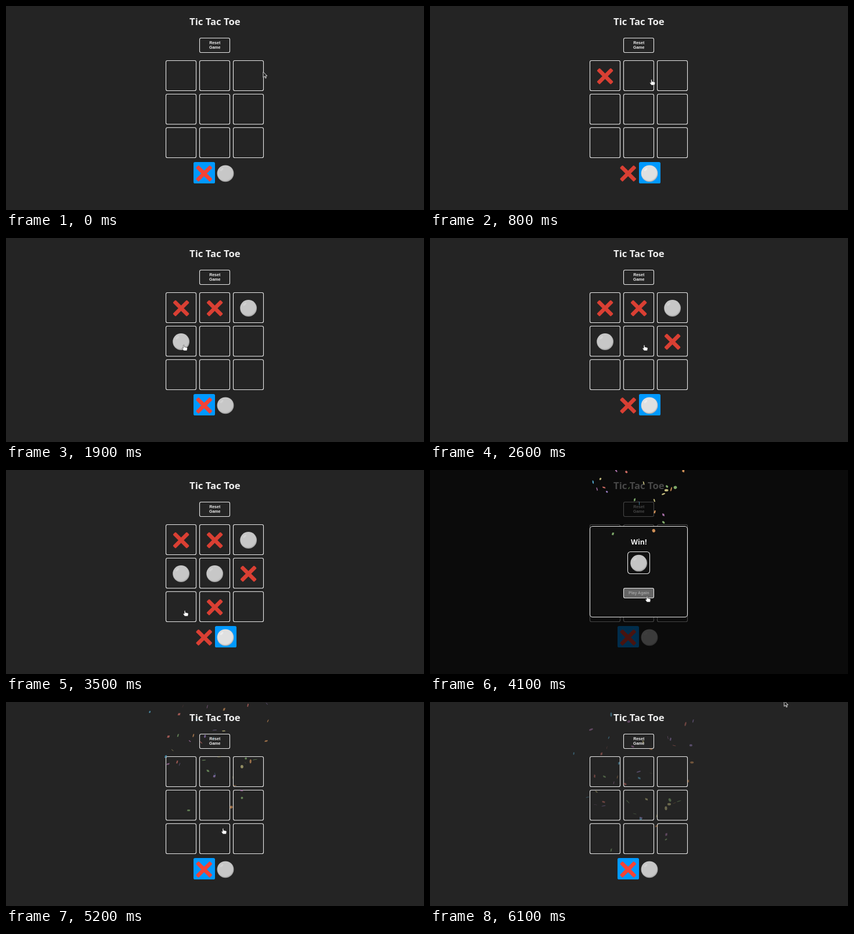
These frames come from a looping animation (720x353 px, 6200 ms). An HTML page with a canvas:

```html
<!DOCTYPE html>
<html lang="en">
<head>
<meta charset="utf-8">
<title>Tic Tac Toe</title>
<style>
  html, body { margin: 0; width: 720px; height: 353px; overflow: hidden; background: #242424; }
  svg, canvas { position: absolute; left: 0; top: 0; display: block; }
  text { text-anchor: middle; fill: #eee; }
  .head { font: bold 16.7px "Noto Sans", "Open Sans", sans-serif; }
  .win { font: bold 12.4px "Noto Sans", "Open Sans", sans-serif; }
  .label { font: bold 7.03px "Liberation Sans", Arial, sans-serif; }
  .box { fill: none; stroke: #e9e9e9; stroke-width: 1.1; }
  .mark { opacity: .87; }
  .mark.on { opacity: 1; }
</style>
</head>
<body>
<svg width="720" height="353" viewBox="0 0 720 353">
  <defs>
    <radialGradient id="pearl" cx=".48" cy=".46" r=".54">
      <stop offset=".82" stop-color="#e0e0e0"/>
      <stop offset="1" stop-color="#adadad"/>
    </radialGradient>
    <g id="X" fill="#f44336">
      <rect x="-17" y="-3.4" width="34" height="6.8" rx="1.6" transform="rotate(45)"/>
      <rect x="-17" y="-3.4" width="34" height="6.8" rx="1.6" transform="rotate(-45)"/>
    </g>
    <g id="O">
      <circle r="14.4" fill="url(#pearl)"/>
      <ellipse cx="-6.5" cy="-7" rx="3.6" ry="1.8" transform="rotate(-42 -6.5 -7)" fill="#fff" opacity=".4"/>
    </g>
  </defs>

  <text class="head" x="359.9" y="33">Tic Tac Toe</text>
  <rect class="box" x="333.5" y="55.5" width="52" height="25" rx="2.4"/>
  <text class="label" x="359.7" y="66.2">Reset</text>
  <text class="label" x="359.7" y="74.2">Game</text>

  <g id="board"></g>

  <rect id="turn" y="270" width="37" height="37" rx="2.6" fill="#09f"/>
  <use id="turnX" class="mark" href="#X" x="341.2" y="289.8"/>
  <use id="turnO" class="mark" href="#O" x="378" y="289.8"/>

  <g id="modal">
    <rect width="720" height="353" opacity=".7"/>
    <rect class="box" x="275.5" y="97.5" width="168" height="157" rx="4.6" style="fill:#111"/>
    <text class="win" x="359.8" y="128.6">Win!</text>
    <rect class="box" x="340.5" y="141.5" width="38" height="38" rx="5"/>
    <use class="mark" href="#O" x="359.6" y="161.2"/>
    <rect id="again" class="box" x="333.5" y="204.5" width="52" height="17" rx="2.4"/>
    <text id="againText" class="label" x="359.8" y="215.3">Play Again</text>
  </g>
</svg>
<canvas id="sky" width="720" height="353"></canvas>
<svg width="720" height="353" viewBox="0 0 720 353">
  <path id="arrow" d="M0 0V9.6L2.3 7.6L3.9 11L5.4 10.3L3.9 7H6.8Z"
        fill="#222" stroke="#eee" stroke-width=".9" stroke-linejoin="round"/>
  <path id="hand" d="M0 1.2Q.9 0 1.8 1.2V4L6 4.9Q7.2 5.4 7 6.8L6.2 10.4H.7L-2 6.8Q-2.2 5.5 -.9 5.8L0 6.5Z"
        fill="#fff" stroke="#111" stroke-width=".5" stroke-linejoin="round"/>
</svg>
<script>
const LOOP = 6200, STEP = 100, CLOSED = 5000;
const $ = id => document.getElementById(id);

// Cells in order of play; X starts, the players alternate at a steady pace
const ORDER = [0, 2, 1, 3, 5, 4, 7, 6];
const clickAt = n => 520 + 440 * n;
const WON = clickAt(ORDER.length - 1);

const SIZE = 52, PITCH = 58;
const cellPos = i => [275.5 + PITCH * (i % 3), 94.5 + PITCH * Math.floor(i / 3)];
const aim = i => cellPos(i).map((v, axis) => v + [24, 32][axis]);

// Pointer stops: time, x, y
const STOPS = [
  [0, 443, 114],
  ...ORDER.map((cell, n) => [clickAt(n), ...aim(cell)]),
  [4100, 373, 218], [5400, 373, 218], [6100, 610, -2]
];

function add(tag, attrs) {
  const el = document.createElementNS('http://www.w3.org/2000/svg', tag);
  for (const key in attrs) el.setAttribute(key, attrs[key]);
  return $('board').appendChild(el);
}

for (let i = 0; i < 9; i++) {
  const [x, y] = cellPos(i);
  add('rect', { class: 'box', x, y, width: SIZE, height: SIZE, rx: 2.6 });
}
const marks = ORDER.map((cell, n) => {
  const [x, y] = cellPos(cell);
  return add('use', { class: 'mark', href: n % 2 ? '#O' : '#X', x: x + 26.1, y: y + 27 });
});

const show = (el, on) => { el.style.display = on ? '' : 'none'; };
const clamp = v => Math.min(1, Math.max(0, v));
const ease = k => k * k * (3 - 2 * k);

function pointer(t) {
  const n = STOPS.findIndex(s => s[0] > t);
  if (n < 0) return STOPS[STOPS.length - 1].slice(1);
  const [t0, x0, y0] = STOPS[n - 1], [t1, x1, y1] = STOPS[n];
  const k = ease((t - t0) / (t1 - t0));
  return [x0 + (x1 - x0) * k, y0 + (y1 - y0) * k];
}

function clickable(x, y, open) {
  const inside = (l, top, w, h) => x > l && x < l + w && y > top && y < top + h;
  if (open) return inside(333, 204, 52, 18);
  return [...Array(9).keys()].some(i => inside(...cellPos(i), SIZE - 1, SIZE - 1));
}

// Confetti: an upward burst slowed by drag, then a steady fall
const COLORS = ['#5fbfe8', '#a98ad8', '#e8786f', '#8fc078', '#d8d08a', '#e8a060', '#c080c0'];
const LAUNCH = 3650, FALL = .08, SCALE = .527;
const ctx = $('sky').getContext('2d');

let seed = 11;
const rnd = (min, max) => {
  seed = (seed * 16807) % 2147483647;
  return min + (max - min) * seed / 2147483647;
};
const pieces = Array.from({ length: 50 }, (_, i) => ({
  color: COLORS[i % COLORS.length],
  angle: rnd(-Math.PI / 8, Math.PI / 8),
  range: rnd(225, 675) * SCALE,
  wobble: rnd(0, 10),
  spin: rnd(.05, .11),
  tilt: rnd(.25, .75) * Math.PI,
  round: i % 2
}));

function confetti(t) {
  ctx.clearRect(0, 0, 720, 353);
  const age = t - LAUNCH;
  if (age <= 0) return;
  const ticks = age / 20, reach = 1 - Math.pow(.9, ticks);
  ctx.globalAlpha = 1 - ticks / 200;
  for (const p of pieces) {
    const x = 360 + p.range * Math.sin(p.angle) * reach;
    const y = 176 - p.range * Math.cos(p.angle) * reach + FALL * age;
    const wobble = p.wobble + p.spin * ticks, tilt = p.tilt + .1 * ticks;
    const wx = 10 * SCALE * Math.cos(wobble), wy = 10 * SCALE * Math.sin(wobble);
    const tx = 2.5 * SCALE * Math.cos(tilt), ty = 2.5 * SCALE * Math.sin(tilt);
    ctx.fillStyle = p.color;
    ctx.beginPath();
    if (p.round) {
      ctx.ellipse(x, y, Math.abs(wx + tx) * .6, Math.abs(wy + ty) * .6, Math.PI / 10 * wobble, 0, 2 * Math.PI);
    } else {
      ctx.moveTo(x, y);
      ctx.lineTo(x + wx, y + ty);
      ctx.lineTo(x + wx + tx, y + wy + ty);
      ctx.lineTo(x + tx, y + wy);
    }
    ctx.fill();
  }
}

function render(t) {
  const open = t >= WON && t < CLOSED, fresh = t >= CLOSED;
  const played = fresh ? 0 : ORDER.filter((_, n) => t >= clickAt(n)).length;
  marks.forEach((mark, n) => show(mark, n < played));

  const turnO = played % 2 === 1;
  $('turn').setAttribute('x', turnO ? 360 : 323);
  $('turnX').classList.toggle('on', !turnO);
  $('turnO').classList.toggle('on', turnO);

  show($('modal'), open);
  const hover = clamp((t - 4025) / 200);
  const ink = Math.round(238 - 204 * hover);
  $('again').style.fill = `rgba(238,238,238,${hover})`;
  $('againText').style.fill = `rgb(${ink},${ink},${ink})`;

  confetti(t);

  const [x, y] = pointer(t), onTarget = clickable(x, y, open);
  for (const id of ['arrow', 'hand']) {
    show($(id), (id === 'hand') === onTarget);
    $(id).setAttribute('transform', `translate(${x} ${y})`);
  }
}

const start = performance.now();
function frame() {
  const t = (performance.now() - start) % LOOP;
  render(Math.floor(t / STEP) * STEP);
  requestAnimationFrame(frame);
}
frame();
</script>
</body>
</html>
```
